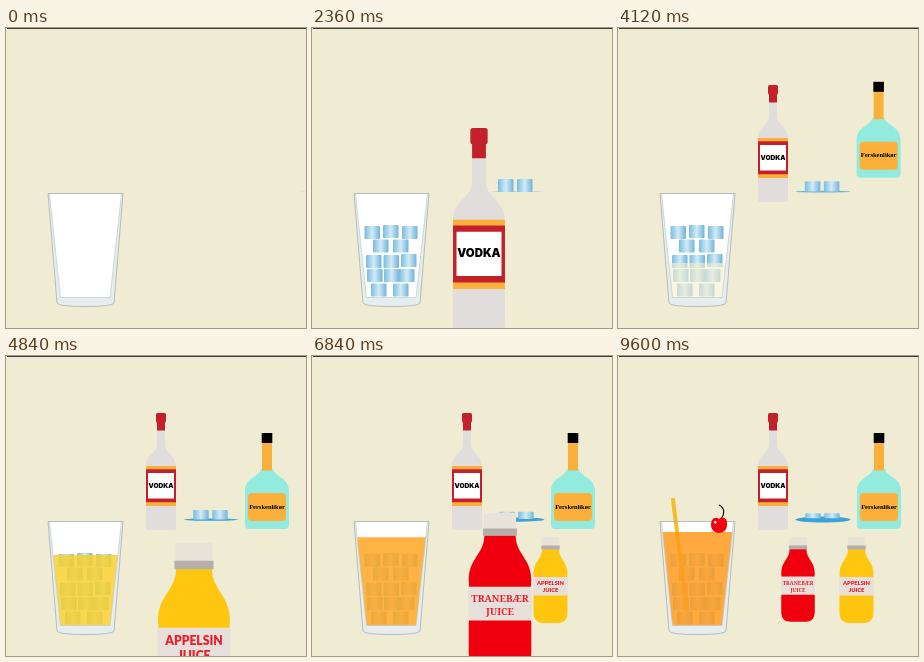
These frames come from a looping animation (300x300 px, 9.64 s). An HTML page with a canvas:

```html
<!DOCTYPE html>
<html lang="da">
<head>
<meta charset="utf-8">
<style>
html, body { margin: 0; height: 100%; overflow: hidden; background: #f0ebd3; }
canvas { display: block; width: 100vw; height: 100vh; }
</style>
</head>
<body>
<canvas width="300" height="300"></canvas>
<script>
const ctx = document.querySelector('canvas').getContext('2d');
const LOOP = 9640;

// Piecewise linear value through [time, value] points
function track(t, ...points) {
  if (t <= points[0][0]) return points[0][1];
  for (let i = 1; i < points.length; i++) {
    const [t0, a] = points[i - 1], [t1, b] = points[i];
    if (t < t1) return a + (b - a) * (t - t0) / (t1 - t0);
  }
  return points[points.length - 1][1];
}

function box(color, x, y, w, h, r = 0) {
  ctx.fillStyle = color;
  ctx.beginPath();
  ctx.roundRect(x, y, w, h, r);
  ctx.fill();
}

function shape(path, fill, stroke, width = 1) {
  const p = new Path2D(path);
  if (fill) { ctx.fillStyle = fill; ctx.fill(p); }
  if (stroke) { ctx.strokeStyle = stroke; ctx.lineWidth = width; ctx.stroke(p); }
}

function label(text, y, font, color) {
  ctx.font = font;
  ctx.fillStyle = color;
  ctx.textAlign = 'center';
  ctx.fillText(text, 0, y);
}

function at(x, y, scale, draw, angle = 0) {
  ctx.save();
  ctx.translate(x, y);
  ctx.rotate(angle);
  ctx.scale(scale, scale);
  draw();
  ctx.restore();
}

function cube(x, y, h = 13) {
  const g = ctx.createLinearGradient(x, 0, x + 15.5, 0);
  g.addColorStop(0, '#78bde2');
  g.addColorStop(.5, '#d3eaf5');
  g.addColorStop(1, '#70b4da');
  box(g, x, y, 15.5, h, 1);
}

const pile = [
  [198, 52.5, 90], [197, 71], [211.5, 61, 81], [227, 54, 71.5],
  [226, 89], [241, 55, 72, 87], [255.5, 59, 81]
];

function vodka() {
  shape('M-4 17V31C-4 40-15 42-15 53V115Q-15 117-13 117H13Q15 117 15 115V53C15 42 4 40 4 31V17Z', '#e1dddd');
  box('#c4202b', -4, 8, 8, 9.5);
  box('#c4202b', -5, 0, 10, 9.5, 1.5);
  box('#fbb03b', -15, 53, 30, 40);
  box('#c4202b', -15, 56.3, 30, 33);
  box('#fff', -13, 60, 26, 25.5);
  label('VODKA', 74.8, '900 6.6px Inter, sans-serif', '#000');
}

function liqueur() {
  shape('M-6 36C-7 44-22 44-22 58V92Q-22 96-18 96H18Q22 96 22 92V58C22 44 7 44 6 36Z', '#93ebdf');
  box('#fbb03b', -5, 9, 10, 28.5);
  box('#000', -5.3, 0, 10.6, 10);
  box('#fbb03b', -19, 60, 38, 28, 4);
  label('Ferskenlikør', 75.5, 'bold 6.5px "Liberation Serif", serif', '#000');
}

function juice(color, name, font) {
  shape('M-18 26C-18 48-36 52-36 78L-34 104L-36 128V160C-36 176-28 182-16 182H16C28 182 36 176 36 160V128L34 104L36 78C36 52 18 48 18 26Z', color);
  box('#e8e2d8', -18.5, 0, 37, 19, 2);
  box('#b5afa9', -19.5, 18, 39, 8.5);
  box('#e7dfd9', -36.5, 85, 73, 39);
  label(name, 102.5, font, '#e9202b');
  label('JUICE', 117.5, font, '#e9202b');
}

function cherry() {
  shape('M2-6C6-11 6-17 0-20', null, '#111', 1.2);
  shape('M0-6C5-10 9-5 8 0C8 5 4 8 0 8C-5 8-8 4-8 0C-8-6-4-9 0-6Z', '#f4000f');
  box('#fff', -5, -4, 2.5, 2.5, 1.2);
}

function drawPlate(t) {
  const x = track(t, [40, 115], [1260, 0]);
  const top = track(t, [0, 151], [2360, 151], [4840, 154], [7680, 156.5], [9600, 157.2]);
  const ry = track(t, [1260, .2], [3480, .6], [4840, 1.2], [7680, 2.5], [9600, 3]);
  const k = track(t, [3000, 0], [4700, 1]);
  ctx.fillStyle = `rgb(${200 - 142 * k},${205 - 43 * k},${195 + 23 * k})`;
  ctx.beginPath();
  ctx.ellipse(205 + x, 163.6, 27.5, ry, 0, 0, 7);
  ctx.fill();
  const h = track(t, [2360, 164], [4840, 163.4], [9600, 162.3]) - top;
  const drift = track(t, [2360, 0], [4840, 1.2]);
  cube(186 + x + drift, top, h);
  cube(205 + x + drift, top, h);
}

function drawGlass(t) {
  shape('M42 165.5H117L108 275Q107 278.5 79.5 278.5Q52 278.5 51 275Z', '#e5edef');
  shape('M43.5 166H115.5L104 269.5H54.5Z', '#fff');

  const dx = track(t, [40, 12], [1260, 0]), dy = track(t, [40, -275], [1260, 0]);
  for (const [y, ...xs] of pile) for (const x of xs) cube(x + dx, y + dy);

  // Straw, anchored at its lower end
  at(track(t, [7680, 60], [8900, 69]), track(t, [7400, 0], [7680, 47], [8900, 255]), 1,
    () => box('#f5bd25', -2, -114, 4, 114),
    track(t, [7680, 0], [8900, -.125]));

  const level = track(t, [2780, 269.5], [3040, 262], [3480, 248], [4040, 235],
    [4200, 235], [4800, 199], [6300, 199], [7000, 176]);
  const channel = (a, b, c) => track(t, [4080, a], [4600, b], [6300, b], [7000, c]);
  const alpha = track(t, [4080, .6], [4600, .85]);
  const left = 43.5 + (level - 166) * .106, right = 115.5 - (level - 166) * .111;
  shape(`M${left} ${level}H${right}L104 269.5H54.5Z`,
    `rgba(${channel(246, 249, 255)},${channel(242, 209, 154)},${channel(222, 48, 30)},${alpha})`);

  shape('M43.5 166L54.5 269.5H104L115.5 166', null, '#b9c3c6', .6);
  shape('M42 165.5H117L108 275Q107 278.5 79.5 278.5Q52 278.5 51 275Z', null, '#a9b1b3', .8);
}

function draw(t) {
  box('#f0ebd3', 0, 0, 300, 300);
  drawPlate(t);
  drawGlass(t);

  at(track(t, [2380, 167], [3190, 155]),
    track(t, [1260, 301], [2360, 100], [2380, 100], [3190, 57]),
    track(t, [2380, 1.73], [3190, 1]), vodka);

  at(track(t, [3000, 258], [4290, 261]), track(t, [3000, -100], [4290, 77]), 1, liqueur);

  at(track(t, [5220, 188], [6120, 238.5]),
    track(t, [4285, 301], [5220, 109], [6120, 181]),
    track(t, [5220, 1], [6120, .472]),
    () => juice('#ffc60f', 'APPELSIN', '900 12.2px Lato, sans-serif'));

  at(track(t, [7040, 188], [8020, 180]),
    track(t, [6080, 301], [7040, 119], [8020, 181]),
    track(t, [7040, .87], [8020, .466]),
    () => juice('#f0000f', 'TRANEBÆR', 'bold 11.2px "Noto Serif", serif'));

  at(track(t, [7680, 98], [8900, 101]), track(t, [7360, -10], [7680, 31], [8900, 169]), 1, cherry);
  box('#3a3a3a', 1, 0, 299, 1);
}

function tick(now) {
  draw(now % LOOP);
  requestAnimationFrame(tick);
}
requestAnimationFrame(tick);
</script>
</body>
</html>
```
